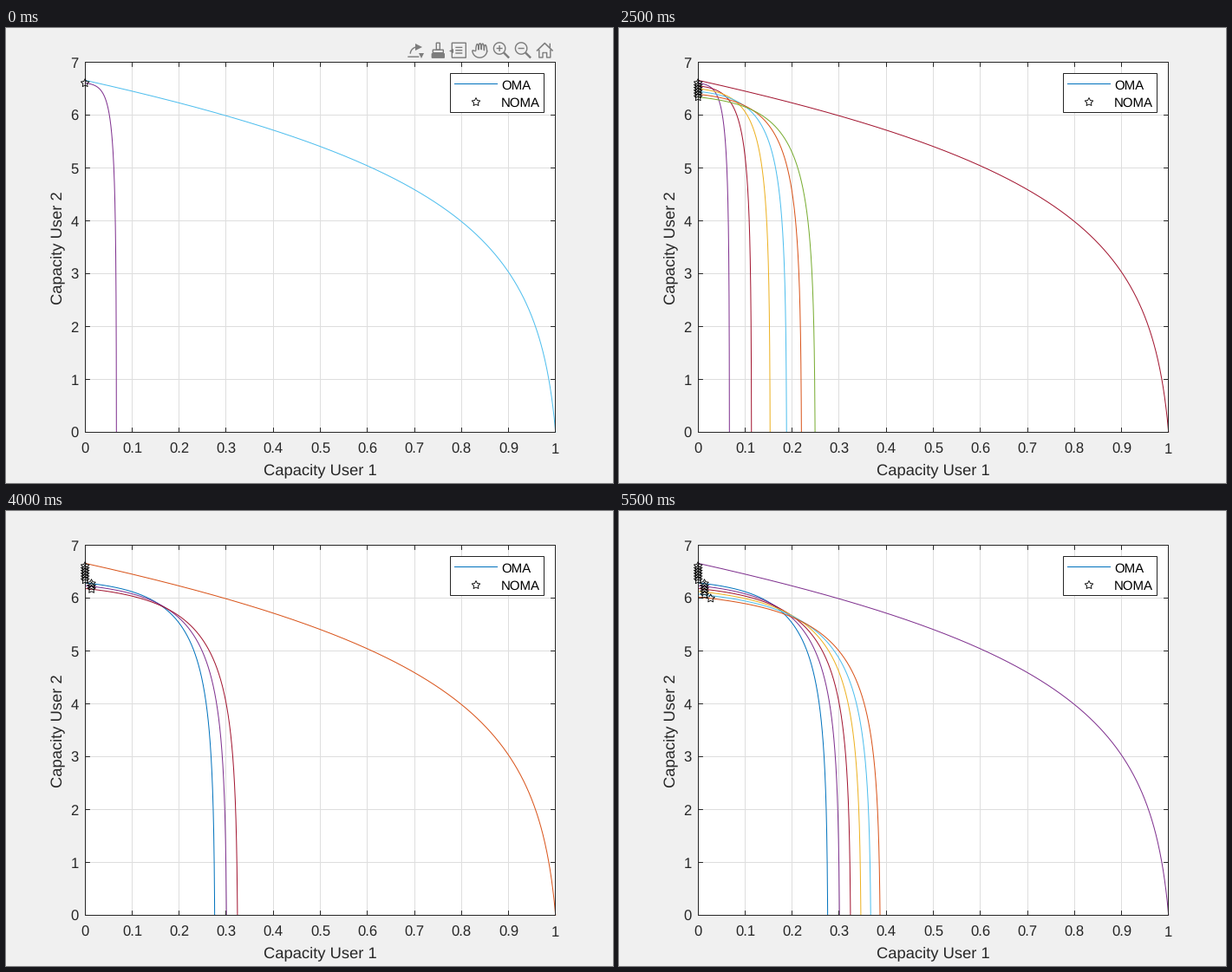
A matplotlib script that plays this animation: 700x525 px, repeating every 6000 ms.

```python
import numpy as np
import matplotlib.pyplot as plt
from matplotlib.animation import FuncAnimation
from matplotlib.patches import Rectangle

W, H, DPI = 700, 525, 100
PX = 72 / DPI  # points per pixel
plt.rcParams.update({
    "font.family": "Liberation Sans",
    "path.snap": False,
    "lines.solid_capstyle": "butt",
    "text.hinting": "no_hinting",
})

INK, ICON, GRID = "#262626", "#7c7c7c", "#dedede"
COLORS = ["#0072bd", "#d95319", "#edb120", "#7e2f8e", "#77ac30", "#4dbeee", "#a2142f"]
FRAMES, GROUP, TOOLBAR_FRAMES = 12, 6, 5
SNR1, SNR2 = 1, 100
TICK = 5.4

fig = plt.figure(figsize=(W / DPI, H / DPI), dpi=DPI, facecolor="#f0f0f0")
ax = fig.add_axes([0, 0, 1, 1])
ax.set_xlim(0, W)
ax.set_ylim(H, 0)
ax.axis("off")


def sx(v):
    return 91.2 + 542.6 * np.asarray(v)


def sy(v):
    return 466.7 - 427.2 * np.asarray(v) / 7


def center(v):
    return np.floor(v) + 0.5


def line(xs, ys, color=INK, width=1.0, z=2, **kw):
    return ax.plot(xs, ys, color=color, lw=width * PX, zorder=z, **kw)[0]


def box(x, y, w, h, z=2, fill="none", edge=INK, width=1.0):
    return ax.add_patch(Rectangle((x, y), w, h, fc=fill, ec=edge, lw=width * PX, zorder=z))


def label(x, y, text, size, color=INK, ha="center", **kw):
    ax.text(x, y, text, fontsize=size * PX, color=color, ha=ha, va="baseline",
            zorder=8, **kw)


def stars(points, z):
    return ax.scatter(*np.transpose(points), s=(10 * PX) ** 2, marker=(5, 1, 0),
                      facecolors="none", edgecolors="black", linewidths=0.85 * PX, zorder=z)


def oma_rates(share, power):
    """Rates of both users for a bandwidth share and a power share of user 1."""
    r1 = share * np.log2(1 + power * SNR1 / share)
    r2 = (1 - share) * np.log2(1 + (1 - power) * SNR2 / (1 - share))
    return r1, r2


def noma_rates(power):
    r1 = np.log2((1 + SNR1) / (1 + (1 - power) * SNR1))
    r2 = np.log2(1 + (1 - power) * SNR2)
    return r1, r2


def draw_axes():
    left, right, top, bottom = center(sx(0)), center(sx(1)), center(sy(7)), center(sy(0))
    box(left, top, right - left, bottom - top, z=0, fill="white", edge="none")
    for v in np.arange(11) / 10:
        x = center(sx(v))
        line([x, x], [top, bottom], GRID, z=1)
        for end, inward in ((bottom, -TICK), (top, TICK)):
            line([x, x], [end, end + inward], z=5)
        label(sx(v), 491, f"{v:g}", 16.67)
    for v in range(8):
        y = center(sy(v))
        line([left, right], [y, y], GRID, z=1)
        for end, inward in ((left, TICK), (right, -TICK)):
            line([end, end + inward], [y, y], z=5)
        label(83.5, sy(v) + 6.2, str(v), 16.67, ha="right")
    box(left, top, right - left, bottom - top, z=5)
    label(362.8, 515, "Capacity User 1", 18.33)
    label(64.5, 253.3, "Capacity User 2", 18.33, rotation=90, rotation_mode="anchor")


def draw_legend():
    box(512.5, 52.5, 108, 45, z=7, fill="white")
    line([517, 567], [64.5, 64.5], COLORS[0], z=8)
    stars([(542, 85.5)], 8)
    label(571, 71, "OMA", 15, "black", "left")
    label(571, 91, "NOMA", 15, "black", "left")


def draw_toolbar():
    parts = []
    cy = 25.7

    def stroke(xs, ys, width=1.4):
        parts.append(line(xs, ys, ICON, width))

    def frame(x, y, w, h, fill="none"):
        parts.append(box(x, y, w, h, fill=fill, edge=ICON, width=1.4))

    def mark(x, y, shape, size):
        parts.append(line([x], [y], ICON, marker=shape, ms=size * PX, mew=0))

    def arc(x, y, rx, ry, start, stop, width=1.4):
        t = np.linspace(start, stop, 40) * np.pi
        stroke(x + rx * np.cos(t), y + ry * np.sin(t), width)

    def export(x):
        arc(x + 4, cy + 4, 9, 8, 1, 1.5)
        mark(x + 5, cy - 3.5, ">", 8)
        stroke([x - 8, x + 5], [cy + 7.5] * 2)
        mark(x + 8, cy + 6, "v", 6)

    def brush(x):
        frame(x, cy - 8.5, 4, 8)
        frame(x - 4, cy - 0.5, 12, 3.5)
        frame(x - 5, cy + 4, 14, 4.5, fill=ICON)

    def data_tip(x):
        frame(x - 7, cy - 8.5, 16, 17)
        for row in (-1, 0, 1):
            stroke([x - 3, x + 5], [cy + 3.3 * row] * 2)
        mark(x - 8, cy, "<", 5)

    def hand(x):
        u = np.linspace(0, 4, 81)
        fingers = cy - 1 - 7 * np.abs(np.sin(np.pi * u)) ** 0.4 + 0.6 * (u - 1.7) ** 2
        stroke(x - 4.5 + 3.2 * u, fingers)
        arc(x, cy, 8.5, 8.5, 0, 1)
        stroke([x - 8.5, x - 4.5], [cy, cy + 1])

    def zoom(x, plus):
        x, y = x - 2.2, cy - 2.2
        arc(x, y, 6.7, 6.7, 0, 2)
        stroke([x + 5, x + 11], [y + 5, y + 11], 2.4)
        stroke([x - 3.5, x + 3.5], [y, y])
        if plus:
            stroke([x, x], [y - 3.5, y + 3.5])

    def home(x):
        stroke([x - 9.3, x, x + 9.3], [cy + 0.8, cy - 8.2, cy + 0.8], 1.6)
        for side in (-1, 1):
            stroke(x + side * np.array([6.5, 6.5, 2.3, 2.3, 0]),
                   cy + np.array([-0.7, 8.3, 8.3, 2.8, 2.8]))
        stroke([x + 6, x + 6], [cy - 8, cy - 3])

    icons = [export, brush, data_tip, hand, lambda x: zoom(x, True),
             lambda x: zoom(x, False), home]
    for i, draw in enumerate(icons):
        draw(471.3 + 25 * i)
    return parts


draw_axes()
draw_legend()
toolbar = draw_toolbar()

power = np.linspace(0, 1, 1001)
coarse_power = np.linspace(0, 1, 101)
oma_curves, best = [], []
for n in range(FRAMES):
    share = 0.01 * (n + 1)
    r1, r2 = oma_rates(share, power)
    oma_curves.append(line(sx(r1), sy(r2), COLORS[(3 + 3 * n) % 7], z=3))
    # mark the largest sum rate
    r1, r2 = oma_rates(share, coarse_power)
    top = np.argmax(r1 + r2)
    best.append((sx(r1[top]), sy(r2[top])))
r1, r2 = noma_rates(power)
noma_curve = line(sx(r1), sy(r2), z=4)
best_points = stars(best, 6)


def update(n):
    first = n - n % GROUP
    for i, curve in enumerate(oma_curves):
        curve.set_visible(first <= i <= n)
    noma_curve.set_color(COLORS[(5 + 3 * n) % 7])
    best_points.set_offsets(best[:n + 1])
    for part in toolbar:
        part.set_visible(n < TOOLBAR_FRAMES)
    return [*oma_curves, noma_curve, best_points, *toolbar]


anim = FuncAnimation(fig, update, frames=FRAMES, interval=500, repeat=True, blit=False)
plt.show()
```
